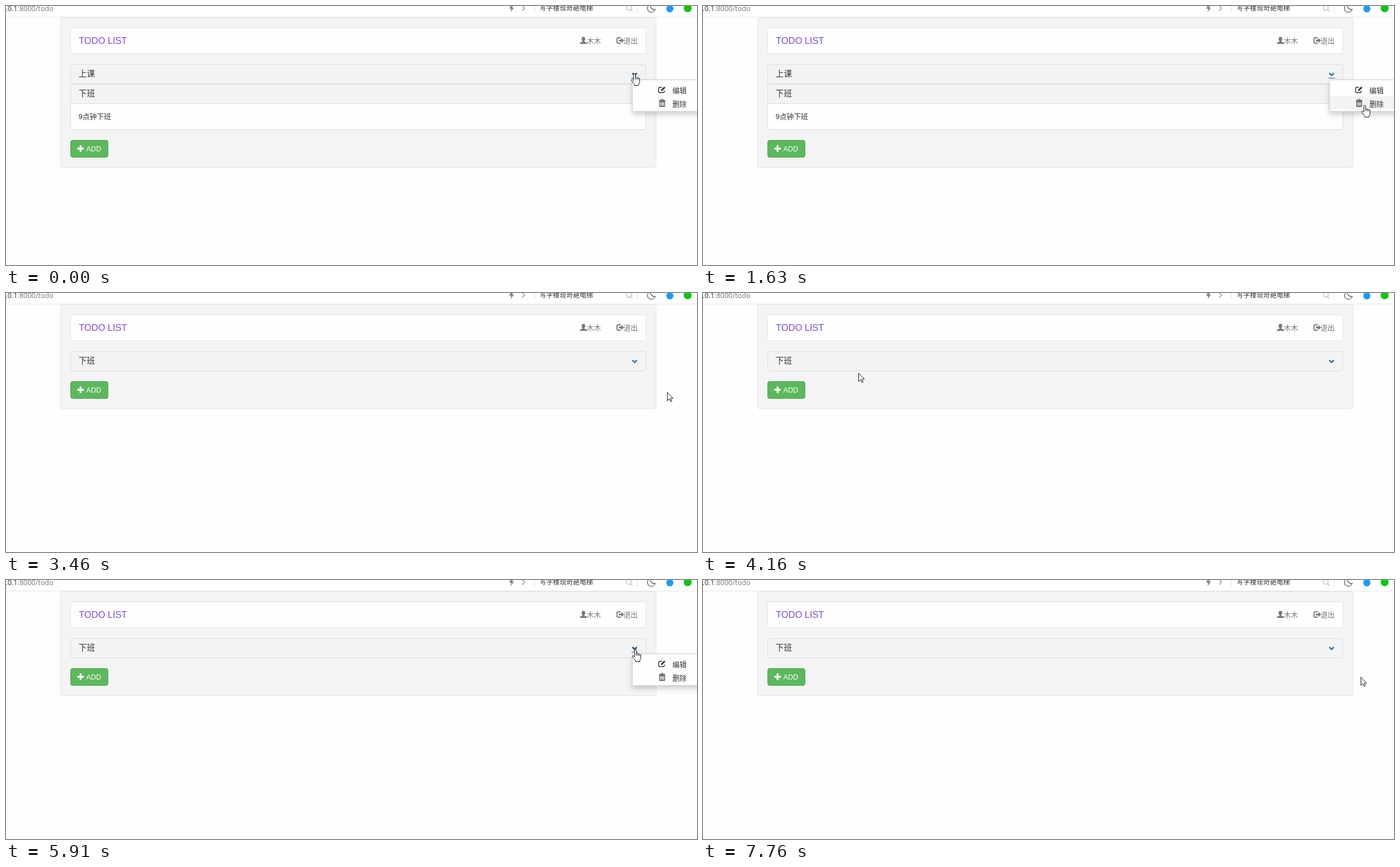
Write an HTML page that moves like this. It is 1223 px wide and 458 px high and loops after 8000 ms.

```html
<!DOCTYPE html>
<html lang="zh-CN">
<head>
<meta charset="utf-8">
<title>Todo list</title>
<style>
  html, body { margin: 0; width: 100%; height: 100%; overflow: hidden; background: #fefefe; }
  svg { display: block; }
  text { font: 12.6px "Liberation Sans", "Noto Sans CJK SC", "Noto Sans CJK", sans-serif; fill: #333; }
  .title { font-size: 14.4px; }
  .nav text { fill: #777; }
  .url { font-family: "Open Sans", sans-serif; font-size: 12.5px; }
  .line { fill: none; }
</style>
</head>
<body>
<svg width="1223" height="458" viewBox="0 0 1223 458">
  <defs>
    <filter id="shadow" x="-20%" y="-30%" width="140%" height="180%">
      <feDropShadow dx="0" dy="5.4" stdDeviation="5" flood-opacity=".175"/>
    </filter>
    <path id="chevron" class="line" d="M1108.6 118.7l4 3.9 4-3.9" stroke-width="2.7"/>
  </defs>

  <!-- browser bar -->
  <rect width="1223" height="19" fill="#fff"/>
  <path d="M0 19.5H1223" stroke="#e6e6e6"/>
  <text class="url" x="84" y="9" text-anchor="end">127.0.0.1<tspan fill="#777">:8000/todo</tspan></text>
  <path d="M893-2h5l-2 5h3l-6 8 1.2-6H891z" fill="#888"/>
  <path class="line" d="M913.5-.5l4.5 4.5-4.5 4.5" stroke="#888" stroke-width="1.2"/>
  <path d="M935.5 0V12M1117.5 0V12" stroke="#ddd"/>
  <text x="944.5" y="8" style="font-size:11.8px">写字楼现奇葩电梯</text>
  <g class="line" stroke="#aaa" stroke-width="1.1">
    <circle cx="1102.3" cy="3.2" r="4.3"/>
    <path d="M1105.5 6.4l3.3 3.4"/>
  </g>
  <path class="line" d="M1140.5-2.5A6.9 6.9 0 1 0 1149 5.8 6.9 6.9 0 0 1 1140.5-2.5z" stroke="#555" stroke-width="1.3"/>
  <circle cx="1175" cy="5" r="6.3" fill="#1a9bfc"/>
  <circle cx="1206.5" cy="4" r="7" fill="#0bc70b"/>

  <!-- page -->
  <rect id="well" x="96.5" y="20.5" width="1054" height="265" rx="3.6" fill="#f4f4f4" stroke="#e3e3e3"/>
  <g class="nav">
    <rect x="114.5" y="38.5" width="1018" height="46" rx="3.6" fill="#fefefe" stroke="#e4e4e4"/>
    <text x="129" y="67" style="font-size:16.2px;fill:#7b4bd8">TODO LIST</text>
    <path d="M1022 54.6c2.1 0 3.3 1.6 3.2 3.7-.1 1.8-.8 3-1.6 3.7v.9l4 1.8q.7.4.7 1.3v1H1015.7v-1q0-.9.7-1.3l4-1.8v-.9c-.8-.7-1.5-1.9-1.6-3.7-.1-2.1 1.1-3.7 3.2-3.7z" fill="#777"/>
    <text x="1028" y="66">木木</text>
    <path class="line" d="M1088 56.3h-4.6q-2 0-2 2v5.4q0 2 2 2h4.6" stroke="#777" stroke-width="1.9"/>
    <path d="M1084.6 59.4h4.6v-2.8l4.7 4.4-4.7 4.4v-2.8h-4.6z" fill="#777"/>
    <text x="1093" y="66">退出</text>
  </g>

  <g id="panels"></g>

  <g id="add">
    <rect x="114.5" y="237.5" width="66" height="30" rx="3.4" fill="#5cb85c" stroke="#48a648"/>
    <path d="M132 246.3v11.6M126.2 252.1h11.6" stroke="#fff" stroke-width="3.2"/>
    <text x="142" y="257" style="fill:#fff">ADD</text>
  </g>

  <path id="underline" d="M1107 127.5h11.5" stroke="#2f5878"/>

  <g id="menu">
    <rect x="1108.5" y="130.5" width="144" height="56" rx="3.6" fill="#fefefe" stroke="#ccc" filter="url(#shadow)"/>
    <rect id="hover" x="1109" width="114" height="23" fill="#f3f3f3"/>
    <path class="line" d="M1161 143.7h-3.8q-2 0-2 2v5.6q0 2 2 2h5.8q2 0 2-2v-1.8" stroke="#333" stroke-width="1.5"/>
    <path d="M1158.9 150.6l.5-2.6 5.6-5.6 2 2-5.6 5.6z" fill="#333"/>
    <text x="1179.5" y="154">编辑</text>
    <g class="line" stroke="#444">
      <path d="M1155.5 167.2h11.6" stroke-width="1.3"/>
      <path d="M1159.3 166.6v-1.6h4v1.6" stroke-width="1"/>
      <path d="M1157 169v8.5h8.6v-8.5z" stroke-width="1.3"/>
      <path d="M1159.8 169v8M1162.8 169v8" stroke-width="1"/>
    </g>
    <text x="1179.5" y="178">删除</text>
  </g>

  <path id="arrow" d="M.5.7V15.4L3.9 12.2 6.3 17.1 8.5 16.1 6.1 11.3H10.5z" fill="#fff" stroke="#111"/>
  <g id="hand" stroke="#111" stroke-linejoin="round">
    <path d="M4.6 13V2.2a1.6 1.6 0 0 1 3.2 0V7.4q.4-.7 1.4-.6 1.1.1 1.4 1.2.4-.6 1.2-.5 1.1.1 1.4 1.2.4-.4 1-.3 1.3.2 1.3 1.6v4.5q0 2-1 3.5-.8 1-.8 2.5v.9H6.2v-.9q-.3-1.8-1.6-3.2L1.2 13.2Q.3 11.8 1.3 11.1q1.1-.6 2.1.7z" fill="#fff"/>
    <path class="line" d="M7.8 7.4v3.8M10.6 8v3.2M13.2 8.7v2.6"/>
  </g>
</svg>
<script>
const LOOP = 8000, STEP = 122, DELETED = 3460;
const el = id => document.getElementById(id);
const show = (node, on) => node.setAttribute('display', on ? 'inline' : 'none');
const between = (t, a, b) => t >= a && t < b;

// The pointer rests between moves; each move runs in even jumps, one per STEP.
const moves = [];
const move = shape => (start, x, y, steps = 1) => moves.push({ shape, start, x, y, steps });
const hand = move('hand'), arrow = move('arrow');

// open the first menu, go down to "delete"
hand(0, 1106, 119);
hand(680, 1115, 119);
hand(830, 1157, 158, 4);
hand(1350, 1165, 175, 3);
arrow(3030, 1170, 175);
// sweep to the remaining title and back
arrow(3770, 725, 179, 3);
arrow(4160, 275, 141);
hand(4310, 127, 120, 2);
arrow(4830, 694, 152, 2);
arrow(5100, 1135, 170);
arrow(5220, 1124, 129, 2);
// open the second menu, go down, leave
hand(5640, 1112, 125);
hand(5910, 1108, 123);
hand(6720, 1159, 171, 4);
arrow(7640, 1164, 171);

function pointerAt(t) {
  const i = moves.findLastIndex(m => m.start <= t);
  const to = moves[i], from = moves[Math.max(0, i - 1)];
  const done = Math.min(1, (Math.floor((t - to.start) / STEP) + 1) / to.steps);
  const mix = key => Math.round(from[key] + (to[key] - from[key]) * done);
  return { shape: to.shape, x: mix('x'), y: mix('y') };
}

function panel(id, y, title, note) {
  const h = note ? 80 : 34;
  return `<g id="${id}" transform="translate(0 ${y - 103})">
    <rect x="114.5" y="104" width="1018" height="${h}" rx="3.6" fill="none" stroke="#000" stroke-opacity=".05"/>
    <rect x="114.5" y="103.5" width="1018" height="${h}" rx="3.6" fill="${note ? '#fefefe' : '#f3f3f3'}" stroke="#ddd"/>
    ${note ? `<path d="M115 137.5V107q0-3 3-3H1129q3 0 3 3v30.5z" fill="#f3f3f3"/>
    <path d="M115 137.5H1132" stroke="#ddd"/>
    <text x="128.5" y="165">${note}</text>` : ''}
    <text class="title" x="128.5" y="125">${title}</text>
    <use href="#chevron" stroke="#337ab7"/></g>`;
}

el('panels').innerHTML = panel('first', 103, '上课') +
  panel('second', 138, '下班', '9点钟下班') + panel('left', 103, '下班');

function draw(t) {
  const gone = t >= DELETED;
  show(el('first'), !gone);
  show(el('second'), !gone);
  show(el('left'), gone);
  el('well').setAttribute('height', gone ? 184 : 265);
  el('add').setAttribute('transform', `translate(0 ${gone ? -81 : 0})`);

  const { shape, x, y } = pointerAt(t);
  const open = t < 3030 || between(t, 5760, 7640);
  const over = shape === 'hand' && between(x, 1100, 1118) && y < 127;
  const link = el(gone ? 'left' : 'first').querySelector('use');
  link.setAttribute('stroke', over ? '#23527c' : '#337ab7');
  show(el('underline'), open || over);
  show(el('menu'), open);
  show(el('hover'), y >= 137 && y < 183);
  el('hover').setAttribute('y', y < 160 ? 137 : 160);

  for (const id of ['hand', 'arrow']) {
    show(el(id), id === shape);
    el(id).setAttribute('transform', `translate(${x} ${y})`);
  }
}

const start = performance.now();
function tick(now) {
  draw(Math.max(0, now - start) % LOOP);
  requestAnimationFrame(tick);
}
draw(0);
requestAnimationFrame(tick);
</script>
</body>
</html>
```
